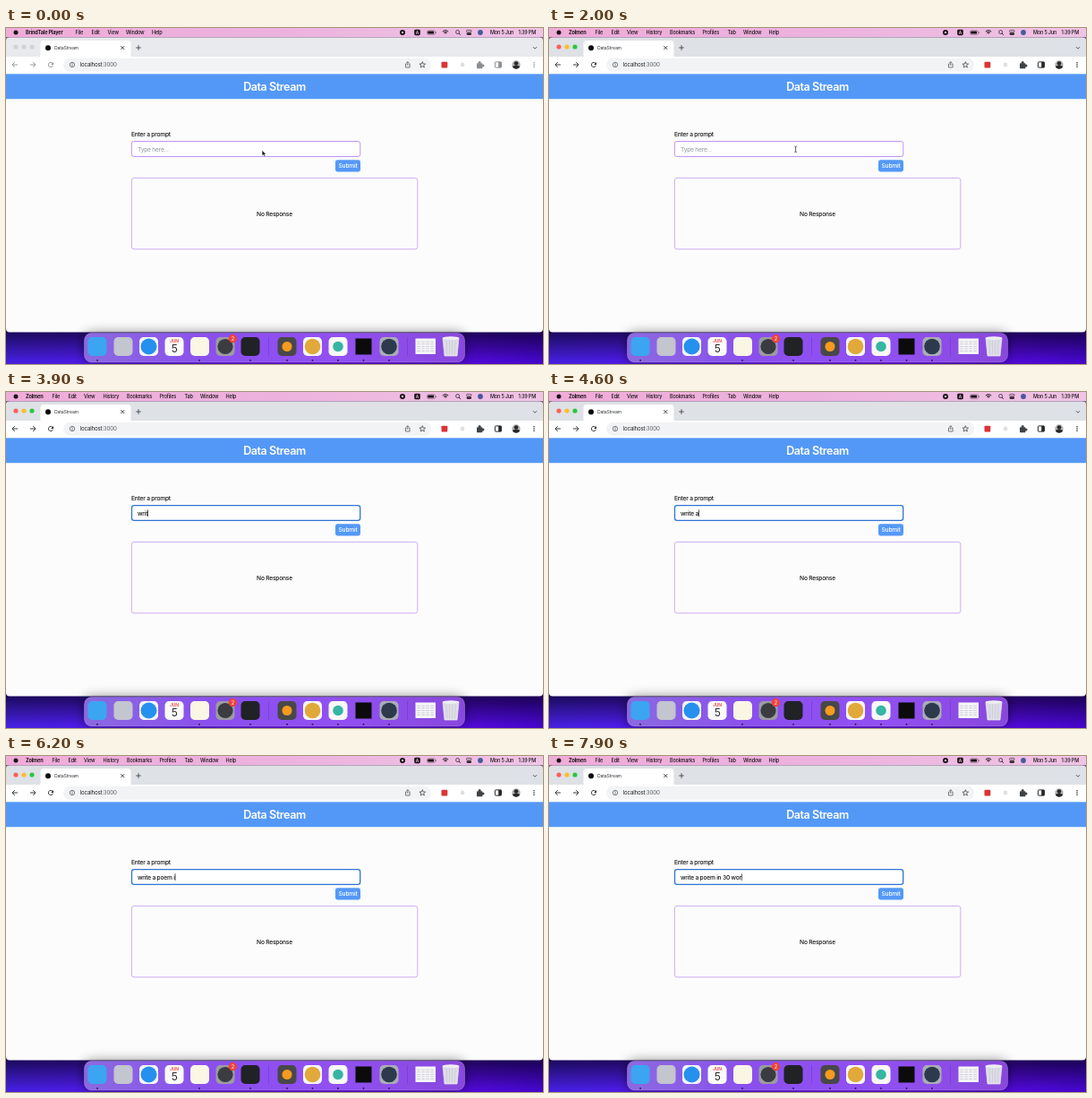
These frames come from a looping animation (600x375 px, 8 s). An HTML page with a canvas:

```html
<!DOCTYPE html>
<html lang="en">
<head>
<meta charset="utf-8">
<title>Data Stream</title>
<style>
html, body { margin: 0; width: 100%; height: 100%; overflow: hidden; background: #fcfcfc; }
canvas { display: block; width: 600px; height: 375px; }
</style>
</head>
<body>
<canvas id="stage"></canvas>
<script>
const LOOP = 8000;
const ACTIVATE = 600, MOVE = 1700, ARRIVE = 2300, FOCUS = 2500;
const TYPE = 3125, KEY = 225;
const PROMPT = 'write a poem in 30 words';

const canvas = document.getElementById('stage');
const ctx = canvas.getContext('2d');
const dpr = window.devicePixelRatio || 1;
canvas.width = 600 * dpr;
canvas.height = 375 * dpr;

function font(size, weight) {
  ctx.font = `${weight} ${size}px Inter, "Open Sans", sans-serif`;
  ctx.letterSpacing = `${(-size * 0.033).toFixed(3)}px`;
}

function text(str, x, y, size, color = '#111', weight = 500, align = 'left') {
  font(size, weight);
  ctx.textAlign = align;
  ctx.textBaseline = 'middle';
  ctx.fillStyle = color;
  ctx.fillText(str, x, y);
}

function rect(x, y, w, h, color) {
  ctx.fillStyle = color;
  ctx.fillRect(x, y, w, h);
}

function round(x, y, w, h, r, fill, stroke, width = 1) {
  ctx.beginPath();
  ctx.roundRect(x, y, w, h, r);
  if (fill) { ctx.fillStyle = fill; ctx.fill(); }
  if (stroke) { ctx.strokeStyle = stroke; ctx.lineWidth = width; ctx.stroke(); }
}

function dot(x, y, r, fill, stroke, width = 0.8) {
  ctx.beginPath();
  ctx.arc(x, y, r, 0, Math.PI * 2);
  if (fill) { ctx.fillStyle = fill; ctx.fill(); }
  if (stroke) { ctx.strokeStyle = stroke; ctx.lineWidth = width; ctx.stroke(); }
}

function line(points, color, width = 0.9) {
  ctx.beginPath();
  points.forEach(([x, y]) => ctx.lineTo(x, y));
  ctx.strokeStyle = color;
  ctx.lineWidth = width;
  ctx.stroke();
}

function arc(x, y, r, from, to, color, width = 0.9) {
  ctx.beginPath();
  ctx.arc(x, y, r, from, to);
  ctx.strokeStyle = color;
  ctx.lineWidth = width;
  ctx.stroke();
}

function polygon(points, fill, stroke, width = 0.6) {
  ctx.beginPath();
  points.forEach(([x, y]) => ctx.lineTo(x, y));
  ctx.closePath();
  if (fill) { ctx.fillStyle = fill; ctx.fill(); }
  if (stroke) { ctx.strokeStyle = stroke; ctx.lineWidth = width; ctx.stroke(); }
}

function gradient([x0, y0, x1, y1], ...colors) {
  const g = ctx.createLinearGradient(x0, y0, x1, y1);
  colors.forEach((c, i) => g.addColorStop(i / (colors.length - 1), c));
  return g;
}

function wallpaper() {
  rect(0, 0, 600, 375, gradient([0, 0, 600, 0], '#4420dc', '#5216e8', '#6a12f2', '#5a0ce0', '#4406c8'));
  rect(0, 335, 600, 40, gradient([0, 338, 0, 372], 'rgba(8,0,30,0.7)', 'rgba(8,0,30,0)'));
  rect(0, 0, 600, 14, '#86688f');
  rect(0, 0, 600, 10, gradient([0, 0, 600, 0], '#f0acd8', '#ecb2de', '#f0c4e5'));
}

function menuBar(active) {
  const ink = '#1a1218';
  dot(11, 5, 2.5, ink);
  text(active ? 'Zolmen' : 'BrindTale Player', 22, 5, 5.6, ink, 700);
  const menus = active
    ? [['File', 51.5], ['Edit', 69.5], ['View', 87], ['History', 108.5], ['Bookmarks', 135],
       ['Profiles', 171.5], ['Tab', 199.5], ['Window', 217], ['Help', 245.5]]
    : [['File', 77.5], ['Edit', 95.5], ['View', 113.5], ['Window', 134], ['Help', 163]];
  for (const [name, x] of menus) text(name, x, 5, 5.5, ink);

  dot(443, 5, 3, ink);
  rect(442, 4, 2, 2, '#f0c4e5');
  round(456.2, 1.8, 6.6, 6.4, 1.4, ink);
  text('A', 459.5, 5.1, 4.8, '#f0c4e5', 600, 'center');
  round(470.5, 2.8, 9, 4.6, 1.3, null, '#6b5264', 0.5);
  round(471.3, 3.6, 6.8, 3, 0.6, ink);
  rect(480, 4.3, 0.7, 1.6, '#6b5264');
  for (const r of [4.6, 3, 1.5]) arc(491, 7.2, r, -Math.PI * 0.75, -Math.PI * 0.25, ink);
  dot(504.6, 4.5, 2, null, ink, 0.7);
  line([[506, 6], [507.8, 7.8]], ink);
  round(514.5, 2.4, 5.6, 2.2, 1.1, null, ink, 0.6);
  round(514.5, 5.5, 5.6, 2.2, 1.1, ink);
  dot(530, 5, 2.9, '#47589a');
  text('Mon 5 Jun', 541, 5, 5.5, ink);
  text('1:39 PM', 592, 5, 5.5, ink, 500, 'right');
}

function browser(active) {
  round(0, 10.8, 600, 328.7, 4, '#fcfcfc');
  round(0, 10.8, 600, 22.2, [4, 4, 0, 0], active ? '#dee1e6' : '#e8eaed');
  const lights = active ? ['#fe5f57', '#febc2e', '#28c840'] : ['#d2d3d6', '#d2d3d6', '#d2d3d6'];
  lights.forEach((c, i) => dot(11 + i * 9, 21, 2.6, c));

  round(38.5, 14, 101, 20, [3.5, 3.5, 0, 0], '#fff');
  rect(0, 32, 600, 20, '#fff');
  dot(47, 22.2, 3, '#080808');
  text('DataStream', 54, 22.5, 5.2, '#33363a', 400);
  line([[128.3, 20.1], [132.3, 24.1]], '#303338');
  line([[132.3, 20.1], [128.3, 24.1]], '#303338');
  line([[145.2, 22], [150.8, 22]], '#45494d');
  line([[148, 19.2], [148, 24.8]], '#45494d');
  line([[589, 21.2], [591, 23.2], [593, 21.2]], '#45494d');

  toolbar(active);
}

function toolbar(active) {
  const ink = active ? '#25282b' : '#8b8f94';
  line([[7, 41], [13, 41]], ink);
  line([[9.8, 38.2], [7, 41], [9.8, 43.8]], ink);
  line([[27, 41], [33, 41]], ink);
  line([[30.2, 38.2], [33, 41], [30.2, 43.8]], ink);
  arc(50, 41, 2.6, 0.3, Math.PI * 1.75, ink);
  polygon([[53, 38], [53, 41], [50.2, 41]], ink);

  round(64, 33.8, 411, 14.8, 7.4, '#f1f3f4');
  dot(74, 41, 2.7, null, '#4b4f54', 0.7);
  rect(73.6, 40.5, 0.8, 2.1, '#4b4f54');
  rect(73.6, 39.1, 0.8, 0.8, '#4b4f54');
  text('localhost', 82.7, 41.2, 6.2, '#202124', 400);
  text(':3000', 82.7 + ctx.measureText('localhost').width, 41.2, 6.2, '#5f6368', 400);

  line([[447.7, 40], [446.5, 40], [446.5, 44], [451.1, 44], [451.1, 40], [450, 40]], '#45494d', 0.7);
  line([[448.8, 42], [448.8, 37.8]], '#45494d', 0.7);
  line([[447.3, 39.1], [448.8, 37.6], [450.3, 39.1]], '#45494d', 0.7);
  const star = Array.from({ length: 10 }, (_, i) => {
    const r = i % 2 ? 1.5 : 3.5, a = i * Math.PI / 5 - Math.PI / 2;
    return [465.3 + r * Math.cos(a), 41.2 + r * Math.sin(a)];
  });
  polygon(star, null, '#303338', 0.7);

  round(486.5, 37.8, 6.8, 6.6, 0.8, '#dc3334');
  dot(510, 41, 2.4, '#dfe0e2');
  const piece = active ? '#3f4347' : '#8b8f94';
  round(526, 39.2, 6.4, 6, 0.8, piece);
  dot(529.2, 38.6, 1.5, piece);
  dot(533, 42, 1.5, piece);
  round(546.4, 37.9, 7, 6.2, 0.7, null, ink, 1);
  rect(550.2, 37.9, 3.2, 6.2, ink);

  ctx.save();
  dot(570, 41, 4.7, '#b4b2b0');
  ctx.clip();
  dot(570, 39.6, 2.3, '#29292b');
  round(565.4, 42, 9.2, 6, 3, '#27282c');
  ctx.restore();
  for (const y of [38.7, 41, 43.3]) dot(590, y, 0.8, ink);
}

function page(t) {
  const focused = t >= FOCUS;
  rect(0, 51.3, 600, 27.9, '#5498f7');
  text('Data Stream', 300, 66.5, 12.5, '#fff', 600, 'center');
  text('Enter a prompt', 140, 118.5, 6.67);

  if (focused) round(140.5, 126.6, 255.2, 16.7, 2.6, '#fff', '#2f74d2', 1.3);
  else round(140.4, 126.5, 255.4, 17, 2.5, '#fff', '#bd8af3', 0.9);

  const count = t < TYPE ? 0 : Math.min(PROMPT.length, Math.floor((t - TYPE) / KEY) + 1);
  const typed = PROMPT.slice(0, count);
  if (count) text(typed, 147, 135.5, 6.67);
  else text('Type here...', 147, 135.5, 6.67, '#8f949d', 400);

  const lit = count > 0 || (t - FOCUS) % 1000 < 500;
  if (focused && lit) {
    font(6.67, 500);
    rect(147.1 + ctx.measureText(typed).width, 131.4, 0.7, 7.6, '#111');
  }

  round(368, 147.3, 28, 13.2, 2.4, '#5498f7');
  text('Submit', 382, 154.3, 6.67, '#fff', 500, 'center');
  round(140.4, 167.4, 319.4, 79.4, 2.5, null, '#c39bf1', 0.8);
  text('No Response', 300, 207.5, 6.67, '#111', 500, 'center');
}

function tile(x, color) {
  round(x - 10.5, 345, 21, 21, 4.8, color);
}

function dock() {
  ctx.save();
  ctx.shadowColor = 'rgba(0,0,0,0.5)';
  ctx.shadowBlur = 13 * dpr;
  round(87.5, 340.5, 425, 32.5, 8, gradient([87, 0, 513, 0], '#8a6ae0', '#8b4fee', '#9150f2', '#8848dc'));
  ctx.restore();
  round(87.5, 340.5, 425, 32.5, 8, null, 'rgba(225,200,255,0.45)', 0.6);

  tile(102, '#3ba5f2');
  tile(131, '#c3c5cf');
  tile(159.5, '#f3f5f7');
  dot(159.5, 355.5, 9, '#2590ee');

  tile(188, '#fafafa');
  text('JUN', 188, 349, 5, '#e8453f', 600, 'center');
  text('5', 188, 358.2, 12, '#2b2b2d', 400, 'center');

  tile(216.5, '#faf6e4');
  tile(245, '#9a9ca1');
  dot(245, 355.5, 8.6, '#3a3c40');
  dot(253.3, 346.7, 4.6, '#ef4338');
  text('2', 253.3, 346.9, 5.6, '#fff', 400, 'center');
  tile(273, '#202225');
  rect(293, 345, 0.6, 21, 'rgba(60,20,130,0.35)');

  tile(314, '#484848');
  dot(314, 355.5, 5.5, '#f79a20');
  tile(342.5, '#f5f5f5');
  dot(342.5, 355.5, 8.8, '#e0a93a');
  tile(371, '#f8f8f8');
  dot(371, 355.5, 5.8, '#36b5a2');
  rect(390.5, 346.5, 18, 18, '#0b0b0b');
  tile(428, '#a9adb6');
  dot(428, 355.5, 8.8, '#2c3a4c');
  rect(448, 345, 0.6, 21, 'rgba(60,20,130,0.35)');

  documents();
  trash();
  for (const x of [102, 216, 273, 314, 342.5, 371, 399.5, 428]) dot(x, 370.9, 0.9, '#22103f');
}

function documents() {
  rect(457.5, 346.5, 22.5, 17.5, '#f4f4f6');
  for (let i = 0; i < 4; i++) {
    for (let j = 0; j < 5; j++) rect(459.3 + i * 5, 349.8 + j * 2.6, 3.5, 0.8, '#c6c5cc');
  }
}

function trash() {
  polygon([[488, 346], [506, 346], [504, 366], [490, 366]], '#dddde5', '#f0f0f4', 0.7);
  for (let i = 0; i < 4; i++) line([[492 + i * 3.4, 348.5], [492.7 + i * 2.9, 364]], '#c5c3d2', 0.6);
  ctx.beginPath();
  ctx.ellipse(497, 346, 9.2, 1.8, 0, 0, Math.PI * 2);
  ctx.fillStyle = '#eeeef3';
  ctx.fill();
}

function pointer(t) {
  if (t >= TYPE) return;
  if (t < MOVE) {
    const x = 286.2, y = 136.6;
    polygon([[x, y], [x, y + 5.9], [x + 1.4, y + 4.7], [x + 2.3, y + 6.8], [x + 3.3, y + 6.3],
      [x + 2.4, y + 4.3], [x + 4.2, y + 4.3]], '#080808', '#fff', 0.4);
    return;
  }
  const p = Math.min(1, (t - MOVE) / (ARRIVE - MOVE));
  const ease = p * p * (3 - 2 * p);
  const x = 286.2 - 21.2 * ease, y = 137 - 3.3 * ease;
  line([[x, y - 3], [x, y + 3]], '#222', 0.7);
  line([[x - 1.4, y - 3.3], [x, y - 2.8], [x + 1.4, y - 3.3]], '#222', 0.6);
  line([[x - 1.4, y + 3.3], [x, y + 2.8], [x + 1.4, y + 3.3]], '#222', 0.6);
}

function draw(now) {
  const t = now % LOOP;
  const active = t >= ACTIVATE;
  ctx.setTransform(dpr, 0, 0, dpr, 0, 0);
  wallpaper();
  menuBar(active);
  browser(active);
  page(t);
  dock();
  pointer(t);
}

let start;
function tick(now) {
  start ??= now;
  draw(now - start);
  requestAnimationFrame(tick);
}
draw(0);
requestAnimationFrame(tick);
</script>
</body>
</html>
```
